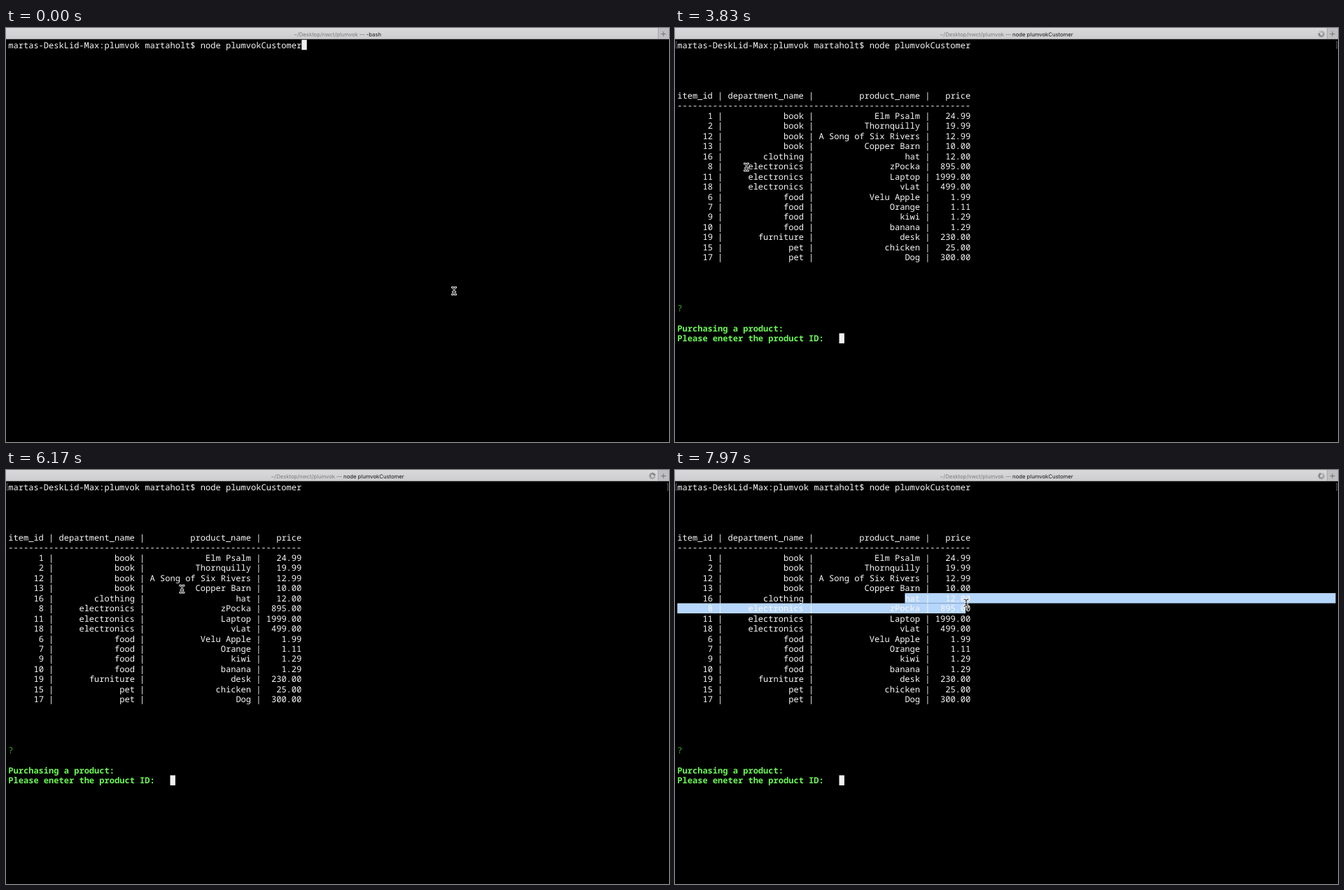
An HTML page for the animation above (8 s loop, 947 px wide and 592 px high).

```html
<!DOCTYPE html>
<html lang="en">
<head>
<meta charset="utf-8">
<title>Terminal</title>
<style>
  html, body { margin: 0; width: 100%; height: 100%; overflow: hidden; background: #000; }
  svg { display: block; width: 947px; height: 592px; }
  text { white-space: pre; text-rendering: geometricPrecision; }
  .term { font: 500 12.04px "Noto Sans Mono", "DejaVu Sans Mono", monospace; fill: #f8f8f8; }
  .bold { font-weight: 700; fill: #6cfb55; }
  .mark { font-weight: 400; fill: #35b524; }
  .title { font: 7.7px Inter, "Liberation Sans", sans-serif; fill: #7c7c7c; text-anchor: middle; }
  .title tspan { fill: #161616; }
</style>
</head>
<body>
<svg id="stage" viewBox="0 0 947 592">
  <defs>
    <linearGradient id="bar" x1="0" y1="0" x2="0" y2="1">
      <stop offset="0" stop-color="#d9d9dc"/>
      <stop offset="1" stop-color="#cdcdd0"/>
    </linearGradient>
  </defs>
  <rect width="947" height="592"/>
  <rect width="947" height="16" fill="url(#bar)"/>
  <rect x="931" width="16" height="16" fill="#bfbfc2"/>
  <path d="M0 15.7H947M931.5 0V16" stroke="#a2a2a5" stroke-width=".8"/>
  <path d="M935.5 8.5h7M939 5v7" stroke="#727275"/>
  <text id="title" class="title" x="473.5" y="11.5">~/Desktop/nwct/plumvok — <tspan id="process"></tspan></text>
  <g id="spinner" transform="translate(923.3 8.5)" stroke="#3c3c3f" stroke-width="1" stroke-linecap="round"></g>
  <g id="select" fill="#b6d6fb"></g>
  <g id="screen" class="term"></g>
  <path id="brackets" d="M3 19.5H1.5V29H3M944 19.5h1.5V29H944" fill="none" stroke="#777" stroke-width=".8"/>
  <rect id="caret" width="7.4" height="14.4" fill="#f1f1f1"/>
  <g id="mouse" fill="none" stroke-linecap="round">
    <path id="beamEdge" stroke="#e8e8e8" stroke-width="2.8"/>
    <path id="beam" stroke="#111" stroke-width="1"/>
  </g>
</svg>
<script>
const LOOP = 8000, LEFT = 3.3, TOP = 16.9, CELL = 7.224, ROW = 14.47;
const ENTER = 930, BUSY = 1000, TABLE = 1950, PRESS = 7450;
const NS = "http://www.w3.org/2000/svg";
const $ = id => document.getElementById(id);
const colX = c => LEFT + c * CELL;
const rowY = r => TOP + r * ROW;
const clamp = (v, a, b) => Math.min(b, Math.max(a, v));

function add(parent, tag, attrs, text) {
  const el = document.createElementNS(NS, tag);
  for (const k in attrs) el.setAttribute(k, attrs[k]);
  if (text) el.textContent = text;
  return parent.appendChild(el);
}

function set(el, attrs) {
  for (const k in attrs) el.setAttribute(k, attrs[k]);
}

// Each word starts on its own grid column.
function print(parent, row, str, cls = "") {
  for (const m of str.matchAll(/\S+/g))
    add(parent, "text", { x: colX(m.index), y: rowY(row) + 11.6, class: cls }, m[0]);
}

const items = `1,book,Elm Psalm,24.99
2,book,Thornquilly,19.99
12,book,A Song of Six Rivers,12.99
13,book,Copper Barn,10.00
16,clothing,hat,12.00
8,electronics,zPocka,895.00
11,electronics,Laptop,1999.00
18,electronics,vLat,499.00
6,food,Velu Apple,1.99
7,food,Orange,1.11
9,food,kiwi,1.29
10,food,banana,1.29
19,furniture,desk,230.00
15,pet,chicken,25.00
17,pet,Dog,300.00`.split("\n");
const widths = [7, 15, 20, 7];
const format = line => line.split(",").map((s, i) => s.padStart(widths[i])).join(" | ");

print($("screen"), 0, "martas-DeskLid-Max:plumvok martaholt$ node plumvokCustomer");
const output = add($("screen"), "g", {});
print(output, 5, format("item_id,department_name,product_name,price"));
print(output, 6, "-".repeat(58));
items.forEach((line, i) => print(output, 7 + i, format(line)));
print(output, 26, "?", "mark");
print(output, 28, "Purchasing a product:", "bold");
print(output, 29, "Please eneter the product ID:", "bold");

const SPOKES = 12;
const spokes = Array.from({ length: SPOKES }, (_, i) =>
  add($("spinner"), "path", { d: "M0 -2.5V-4.5", transform: `rotate(${i * 360 / SPOKES})` }));

const beamPath = "M-2.8 -5Q0 -5 0 -3.2Q0 -5 2.8 -5M-2.8 5Q0 5 0 3.2Q0 5 2.8 5M0 -3.2V3.2M-1.6 1.4H1.6";
$("beam").setAttribute("d", beamPath);
$("beamEdge").setAttribute("d", beamPath);

const selFirst = add($("select"), "rect", { x: colX(45), y: rowY(11), height: ROW });
const selNext = add($("select"), "rect", { x: LEFT, y: rowY(12), height: ROW });

// Pointer stops: time, x, y
const stops = [
  [2680, 640, 376], [3360, 24, 312], [3480, 12, 300], [3830, 102, 199],
  [4130, 92, 215], [4500, 62, 256], [5050, 208, 160], [5430, 206, 157],
  [5900, 216, 164], [6650, 335, 185], [7450, 331, 184], [7930, 416, 190]
];

function pointer(t) {
  if (t <= stops[0][0]) return stops[0].slice(1);
  const i = stops.findIndex(s => s[0] > t);
  if (i < 0) return stops[stops.length - 1].slice(1);
  const [t0, x0, y0] = stops[i - 1], [t1, x1, y1] = stops[i];
  const u = (t - t0) / (t1 - t0), e = u * u * (3 - 2 * u);
  return [x0 + (x1 - x0) * e, y0 + (y1 - y0) * e];
}

function show(el, on) {
  el.style.display = on ? "" : "none";
}

function drawCaret(t) {
  const [col, row] = t < ENTER ? [58, 0] : t < TABLE ? [0, 1] : [32, 29];
  const fade = clamp((t - 30) / 640, 0, 1);
  set($("caret"), {
    x: colX(col), y: rowY(row),
    opacity: t < ENTER ? (1 + Math.cos(fade * 2 * Math.PI)) / 2 : 1
  });
}

function drawSelection(t, x, y) {
  show($("select"), t >= PRESS);
  const col = Math.round((x - LEFT) / CELL);
  const wrapped = y >= rowY(12) - 1;
  const end = wrapped ? 943.6 : colX(Math.max(45, col));
  selFirst.setAttribute("width", end - colX(45));
  selNext.setAttribute("width", wrapped ? col * CELL : 0);
}

function draw(t) {
  const busy = t >= BUSY;
  $("process").textContent = busy ? "node plumvokCustomer" : "-bash";
  show($("spinner"), busy);
  show($("brackets"), t >= ENTER);
  show(output, t >= TABLE);

  const turn = t / 1000 * SPOKES;
  spokes.forEach((s, i) => {
    const age = (((turn - i) % SPOKES) + SPOKES) % SPOKES;
    s.setAttribute("opacity", 0.25 + 0.7 * (1 - age / SPOKES));
  });

  const [x, y] = pointer(t);
  $("mouse").setAttribute("transform", `translate(${x} ${y})`);
  drawCaret(t);
  drawSelection(t, x, y);
}

const start = performance.now();
function tick() {
  draw((performance.now() - start) % LOOP);
  requestAnimationFrame(tick);
}
tick();
</script>
</body>
</html>
```
